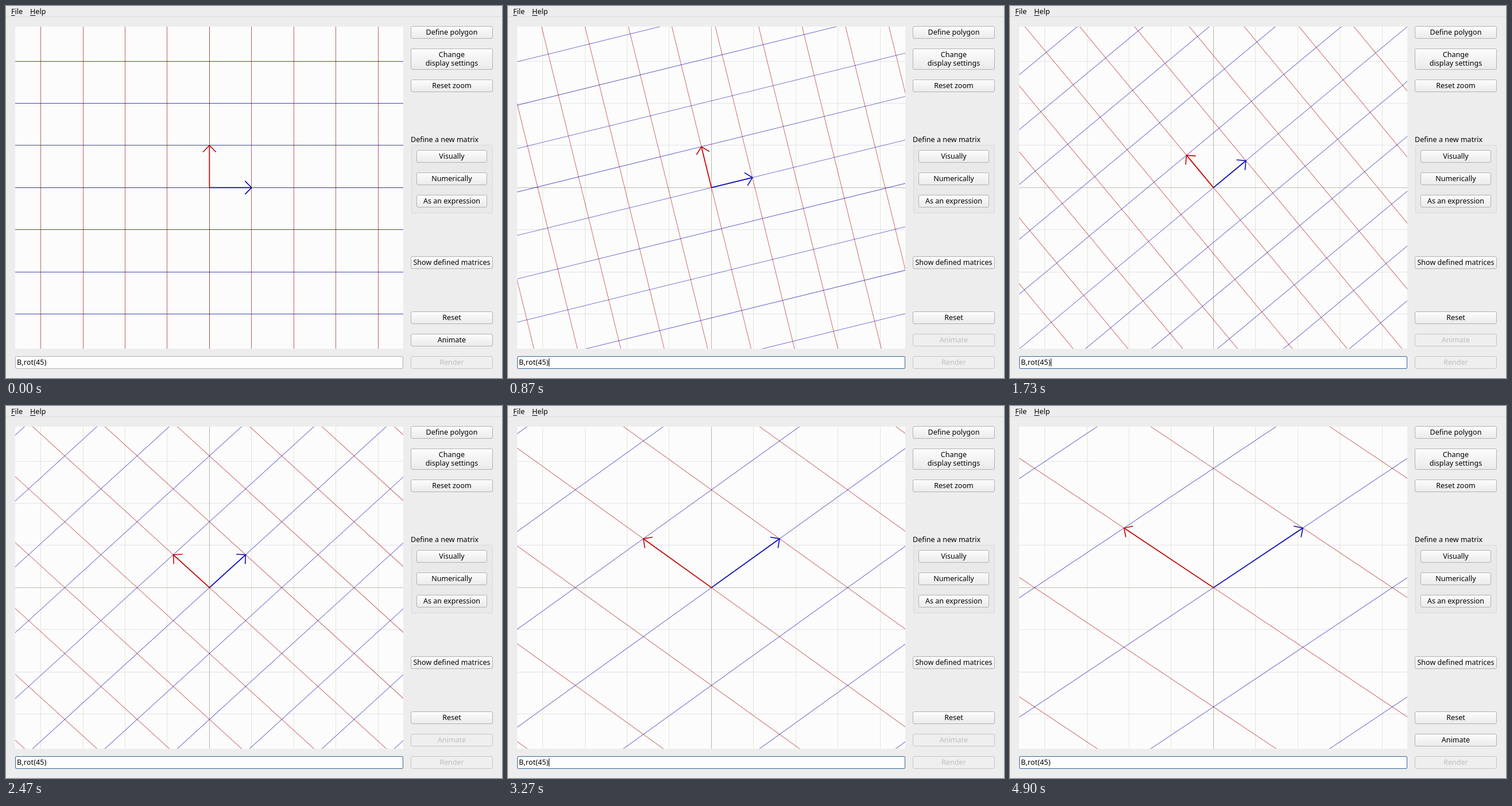
Write an HTML page with a canvas that moves like this. It is 864 by 648 pixels and loops after 4930 ms.

```html
<!DOCTYPE html>
<html lang="en">
<head>
<meta charset="utf-8">
<title>Matrix transformation</title>
<style>
html, body { margin: 0; width: 100%; height: 100%; overflow: hidden; background: #ededed; }
body { position: relative; font: 12.55px/21px "Noto Sans", "Open Sans", sans-serif; color: #000; }
body * { position: absolute; box-sizing: border-box; white-space: nowrap; }
u { position: static !important; text-underline-offset: 2px; }
.bar { left: 0; top: 18px; width: 864px; height: 1px; background: #dcdcdc; }
.group { left: 706px; top: 242px; width: 142px; height: 119px; background: #e9e9e9; border: 1px solid #d9d9d9; border-radius: 3px; }
.btn { border: 1px solid #b2b2b2; border-radius: 3px; background: linear-gradient(#fcfcfc, #ebebeb); display: flex; align-items: center; justify-content: center; text-align: center; white-space: pre; line-height: 14.5px; }
.btn.off { color: #bebebe; border-color: #c6c6c6; background: #efefef; }
#plot { left: 16px; top: 36px; }
#entry { left: 16px; top: 610px; width: 676px; height: 22px; padding-left: 2px; line-height: 20px; letter-spacing: .14px; background: #fdfdfd; border: 1px solid #b2b2b2; border-radius: 2px; }
#entry.focus { border-color: #35679a; }
#caret { left: 71px; top: 614px; width: 1px; height: 14px; background: #000; }
</style>
</head>
<body>
<span style="left:9px;top:-1px"><u>F</u>ile</span>
<span style="left:42px;top:-1px"><u>H</u>elp</span>
<div class="bar"></div>
<canvas id="plot" width="676" height="561"></canvas>
<div id="entry">B,rot(45)</div>
<div id="caret"></div>
<span style="left:705px;top:222px">Define a new matrix</span>
<div class="group"></div>
<script>
const LOOP = 4930, FRAME = LOOP / 148;
const ROTATE = { start: 376, length: 1552 };
const STRETCH = { start: 2303, length: 1490 };
const UNLOCK = 4175, BLINK = 600;
const UNIT = 73.45, CX = 338.4, CY = 280.4, W = 676, H = 561;
const BLUE = '#0808b4', RED = '#c40404';

function button(label, x, y, w = 143, h = 22) {
  const el = document.createElement('div');
  el.className = 'btn';
  el.textContent = label;
  Object.assign(el.style, { left: x + 'px', top: y + 'px', width: w + 'px', height: h + 'px' });
  document.body.append(el);
  return el;
}

button('Define polygon', 705, 35);
button('Change\ndisplay settings', 705, 74, 143, 37);
button('Reset zoom', 705, 128);
button('Visually', 715, 251, 123);
button('Numerically', 715, 290, 123);
button('As an expression', 715, 329, 123);
button('Show defined matrices', 705, 436);
button('Reset', 705, 532);
const animateBtn = button('Animate', 705, 571);
button('Render', 705, 610).classList.add('off');

const entry = document.getElementById('entry');
const caret = document.getElementById('caret');
const ctx = document.getElementById('plot').getContext('2d');

// Matrices are [ix, iy, jx, jy]: the images of the two basis vectors.
const S = Math.SQRT1_2;
const IDENTITY = [1, 0, 0, 1];
const TURNED = [S, S, -S, S];
const FINAL = [3 * S, 2 * S, -3 * S, 2 * S];

const det = m => m[0] * m[3] - m[1] * m[2];
const progress = (t, { start, length }) => Math.min(1, Math.max(0, (t - start) / length));

// Linear blend, rescaled so that the determinant changes smoothly.
function blend(from, to, p) {
  const m = from.map((v, n) => v + p * (to[n] - v));
  const keep = Math.sqrt(det(from) / det(m));
  const grow = 1 + p * (Math.sqrt(det(to) / det(from)) - 1);
  return m.map(v => v * keep * grow);
}

function matrixAt(t) {
  return t < STRETCH.start
    ? blend(IDENTITY, TURNED, progress(t, ROTATE))
    : blend(TURNED, FINAL, progress(t, STRETCH));
}

function stroke(points, color, width) {
  ctx.strokeStyle = color;
  ctx.lineWidth = width;
  ctx.beginPath();
  points.forEach(([x, y]) => ctx.lineTo(x, y));
  ctx.stroke();
}

const snap = v => Math.floor(v) + 0.5;

// Parallel lines along (dx, dy), spaced by (sx, sy).
function family(dx, dy, sx, sy, color, width) {
  for (let k = -14; k <= 14; k++) {
    let x = CX + k * sx * UNIT, y = CY - k * sy * UNIT;
    if (!dx) x = snap(x);
    if (!dy) y = snap(y);
    const far = 25 * UNIT;
    stroke([[x - dx * far, y + dy * far], [x + dx * far, y - dy * far]], color, width);
  }
}

function arrow(vx, vy, color) {
  const x = CX + vx * UNIT, y = CY - vy * UNIT;
  const angle = Math.atan2(y - CY, x - CX);
  const barb = turn => [x - 16.3 * Math.cos(angle + turn), y - 16.3 * Math.sin(angle + turn)];
  stroke([[CX, CY], [x, y]], color, 1.7);
  stroke([barb(Math.PI / 4), [x, y], barb(-Math.PI / 4)], color, 1.6);
}

function drawPlot([ix, iy, jx, jy]) {
  ctx.globalCompositeOperation = 'source-over';
  ctx.fillStyle = '#fcfcfc';
  ctx.fillRect(0, 0, W, H);
  family(0, 1, 1, 0, '#e4e4da', 1);
  family(1, 0, 0, 1, '#e2e2ee', 1);
  stroke([[snap(CX), 0], [snap(CX), H]], '#b6b6a8', 1);
  stroke([[0, snap(CY)], [W, snap(CY)]], '#bdbdb2', 1);
  ctx.globalCompositeOperation = 'multiply';
  family(ix, iy, jx, jy, '#4c4cc4', 0.8);
  family(jx, jy, ix, iy, '#c44c4c', 0.8);
  ctx.globalCompositeOperation = 'source-over';
  arrow(ix, iy, BLUE);
  arrow(jx, jy, RED);
}

const origin = performance.now();

function tick() {
  const time = (performance.now() - origin) % LOOP;
  // Steps begin on times rounded to 10 ms, so allow a little slack.
  const t = Math.floor(time / FRAME + 0.12) * FRAME;
  const focused = t >= ROTATE.start;
  drawPlot(matrixAt(t));
  animateBtn.classList.toggle('off', focused && t < UNLOCK);
  entry.classList.toggle('focus', focused);
  const lit = focused && Math.floor((t - ROTATE.start) / BLINK) % 2 === 0;
  caret.style.visibility = lit ? 'visible' : 'hidden';
  requestAnimationFrame(tick);
}
tick();
</script>
</body>
</html>
```
